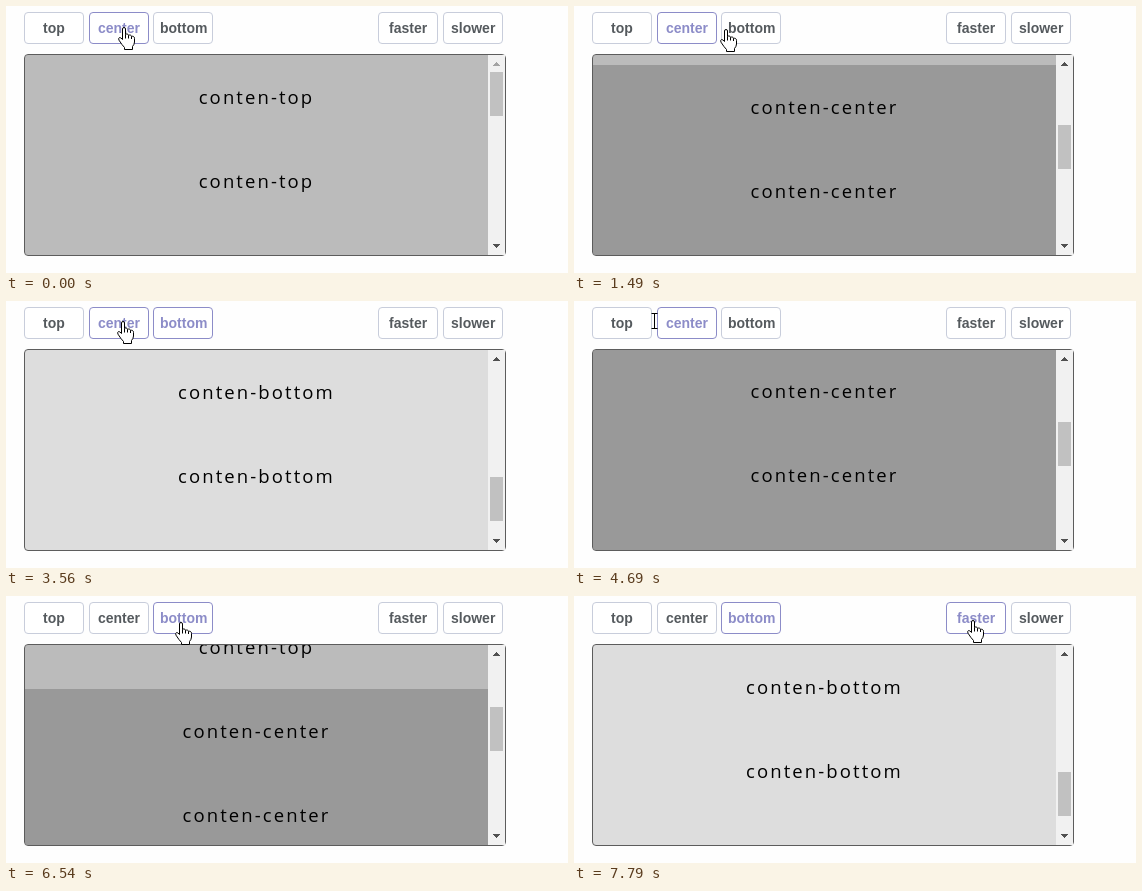
These frames come from a looping animation (562x267 px, 8 s). An HTML page with a canvas:

```html
<!DOCTYPE html>
<html lang="en">
<head>
<meta charset="utf-8">
<title>Scroll to section</title>
<style>
  html, body { margin: 0; width: 100%; height: 100%; overflow: hidden; background: #fefefe; }
  canvas { display: block; width: 562px; height: 267px; }
</style>
</head>
<body>
<canvas id="stage"></canvas>
<script>
const W = 562, H = 267, LOOP = 8000;
const canvas = document.getElementById('stage');
const ctx = canvas.getContext('2d');
const dpr = window.devicePixelRatio || 1;
canvas.width = W * dpr;
canvas.height = H * dpr;

// The screen refreshes in evenly spaced bursts
const BURSTS = [
  { from: 0, to: 0, steps: 1 },
  { from: 1070, to: 1770, steps: 6 },
  { from: 2050, to: 2050, steps: 1 },
  { from: 2630, to: 3560, steps: 8 },
  { from: 4000, to: 4960, steps: 8 },
  { from: 5270, to: 6240, steps: 8 },
  { from: 6390, to: 7380, steps: 8 },
  { from: 7510, to: 7790, steps: 3 }
];

const BUTTONS = [
  { label: 'top', x: 18 },
  { label: 'center', x: 83 },
  { label: 'bottom', x: 147 },
  { label: 'faster', x: 372 },
  { label: 'slower', x: 437 }
];
const BTN = { y: 6, w: 60, h: 32 };

const SECTIONS = [
  { name: 'top', fill: '#bbb' },
  { name: 'center', fill: '#999' },
  { name: 'bottom', fill: '#ddd' }
];
const LINE = 84, SECTION = LINE * 3, TOTAL = SECTION * 3;
const VIEW = { x: 19, y: 49, w: 463, h: 200 };
const BAR = { x: 482, w: 17, button: 17 };

// Scroll start time and section; focus moves on the press, a little earlier
const CLICKS = [
  { at: 1035, to: 1 },
  { at: 2600, to: 2 },
  { at: 4075, to: 1 },
  { at: 5315, to: 0 },
  { at: 6440, to: 2 }
];
const PRESS = 85;

// Pointer moves, each easing out to its end point
const HOME = { x: 118, y: 21 };
const MOVES = [
  { from: 1350, to: 1650, x: 165, y: 24 },
  { from: 1900, to: 2040, x: 169, y: 24 },
  { from: 3160, to: 3500, x: 117, y: 20 },
  { from: 4480, to: 4940, x: 64, y: 18 },
  { from: 5960, to: 6380, x: 175, y: 26 },
  { from: 7300, to: 7770, x: 399, y: 24 }
];

const HAND = new Path2D(
  'M-1.5 12.5V2Q-1.5 .5 0 .5Q1.5 .5 1.5 2V7.5Q2 6.8 3.2 7Q4.5 7.2 4.5 8.5' +
  'Q5.4 7.8 6.4 8.1Q7.5 8.4 7.5 9.6Q8.4 9 9.4 9.4Q10.5 9.9 10.5 11.5V15' +
  'Q10.4 17.5 8.5 19.5V22.5H.5V20.5Q-2 18 -5 13.2Q-5.9 11.4 -4.6 10.6Q-3.3 10.2 -1.5 12.5Z');
const KNUCKLES = new Path2D('M1.5 7.5V11.5M4.5 8.5V11.5M7.5 9.6V12');
const ARROW = new Path2D('M.5 .5V16.5L4.2 13L6.6 18.6L9 17.6L6.6 12.2H11.8Z');
const BEAM = new Path2D('M-3 -7H3M0 -7V8M-3 8H3');

function screenTime(t) {
  const b = BURSTS.findLast(b => b.from <= t);
  if (b.steps === 1) return b.from;
  const gap = (b.to - b.from) / (b.steps - 1);
  return b.from + gap * Math.min(b.steps - 1, Math.floor((t - b.from) / gap + 0.15));
}

function pointerAt(t) {
  let { x, y } = HOME;
  for (const m of MOVES) {
    const k = Math.min(1, Math.max(0, (t - m.from) / (m.to - m.from)));
    const ease = k * (2 - k);
    x += (m.x - x) * ease;
    y += (m.y - y) * ease;
  }
  return { x: Math.round(x), y: Math.round(y) };
}

// Each 60 Hz step covers a tenth of the remaining way, rounded up
function scrollAt(t) {
  let pos = 0;
  for (const { at, to } of CLICKS) {
    const goal = to * SECTION, dir = Math.sign(goal - pos);
    let rest = Math.abs(goal - pos);
    for (let n = Math.floor((t - at) * 0.06); n > 0 && rest > 0; n--) rest -= Math.ceil(rest / 10);
    pos = goal - dir * rest;
    if (t < at) break;
  }
  return pos;
}

function focusAt(t) {
  const click = CLICKS.findLast(c => t >= c.at - PRESS);
  return click ? click.to : -1;
}

function buttonUnder({ x, y }) {
  return BUTTONS.findIndex(b => x >= b.x && x < b.x + BTN.w && y >= BTN.y && y < BTN.y + BTN.h);
}

function outline(x, y, w, h, color) {
  ctx.beginPath();
  ctx.roundRect(x + 0.5, y + 0.5, w - 1, h - 1, 3.5);
  ctx.strokeStyle = color;
  ctx.lineWidth = 1;
  ctx.stroke();
}

function drawButtons(focus, hover) {
  ctx.font = 'bold 14px "Liberation Sans", Arial, sans-serif';
  ctx.letterSpacing = '0px';
  BUTTONS.forEach((b, i) => {
    const lit = i === focus || i === hover;
    ctx.fillStyle = '#fff';
    ctx.fillRect(b.x + 1, BTN.y + 1, BTN.w - 2, BTN.h - 2);
    outline(b.x, BTN.y, BTN.w, BTN.h, lit ? '#8c8cc8' : '#c8cddb');
    ctx.fillStyle = lit ? '#8c8cc8' : '#555a5e';
    const inset = (BTN.w - ctx.measureText(b.label).width) / 2;
    ctx.fillText(b.label, Math.floor(b.x + inset + 0.75), 27);
  });
}

// Scroll arrow built from four pixel rows, starting at its tip
function triangle(y, dir, color) {
  ctx.fillStyle = color;
  for (let i = 0; i < 4; i++) ctx.fillRect(BAR.x + 8 - i, y + i * dir, 2 * i + 1, 1);
}

function drawBar(scroll) {
  const track = VIEW.h - 2 * BAR.button, top = VIEW.y + BAR.button;
  ctx.fillStyle = '#f1f1f1';
  ctx.fillRect(BAR.x, VIEW.y, BAR.w, VIEW.h);
  ctx.fillStyle = '#c1c1c1';
  ctx.fillRect(BAR.x + 2, top + Math.floor(scroll / TOTAL * track), 13, Math.round(VIEW.h / TOTAL * track));
  triangle(VIEW.y + 7, 1, scroll > 0 ? '#505050' : '#a3a3a3');
  triangle(VIEW.y + VIEW.h - 8, -1, '#505050');
}

function drawPanel(scroll) {
  ctx.save();
  ctx.beginPath();
  ctx.roundRect(VIEW.x, VIEW.y, VIEW.w + BAR.w, VIEW.h, 3);
  ctx.clip();
  ctx.font = '18.5px "Open Sans", "Noto Sans", sans-serif';
  ctx.letterSpacing = '2.1px';
  SECTIONS.forEach((s, i) => {
    const y = VIEW.y + i * SECTION - scroll;
    ctx.fillStyle = s.fill;
    ctx.fillRect(VIEW.x, y, VIEW.w, SECTION);
    ctx.fillStyle = '#000';
    const text = 'conten-' + s.name;
    const x = VIEW.x + (VIEW.w - ctx.measureText(text).width) / 2;
    for (let n = 0; n < 3; n++) ctx.fillText(text, x, y + n * LINE + 49);
  });
  ctx.restore();
  outline(18, 48, 482, 202, '#5c5c5c');
  drawBar(scroll);
}

function drawPointer(p) {
  const inRow = (p.x >= 18 && p.x < 207) || (p.x >= 372 && p.x < 497);
  ctx.save();
  ctx.translate(p.x, p.y);
  ctx.lineWidth = 1;
  ctx.lineJoin = 'round';
  ctx.strokeStyle = '#000';
  ctx.fillStyle = '#fff';
  if (buttonUnder(p) >= 0) {
    ctx.fill(HAND);
    ctx.stroke(HAND);
    ctx.stroke(KNUCKLES);
  } else if (inRow) {
    ctx.translate(0.5, 0.5);
    ctx.stroke(BEAM);
  } else {
    ctx.fill(ARROW);
    ctx.stroke(ARROW);
  }
  ctx.restore();
}

function draw(time) {
  const t = screenTime(time);
  ctx.setTransform(dpr, 0, 0, dpr, 0, 0);
  ctx.fillStyle = '#fefefe';
  ctx.fillRect(0, 0, W, H);
  // The hover style lags slightly behind the pointer
  drawButtons(focusAt(t), buttonUnder(pointerAt(t - 60)));
  drawPanel(scrollAt(t));
  drawPointer(pointerAt(t));
}

const start = performance.now();
function loop() {
  draw((performance.now() - start) % LOOP);
  requestAnimationFrame(loop);
}
loop();
</script>
</body>
</html>
```
